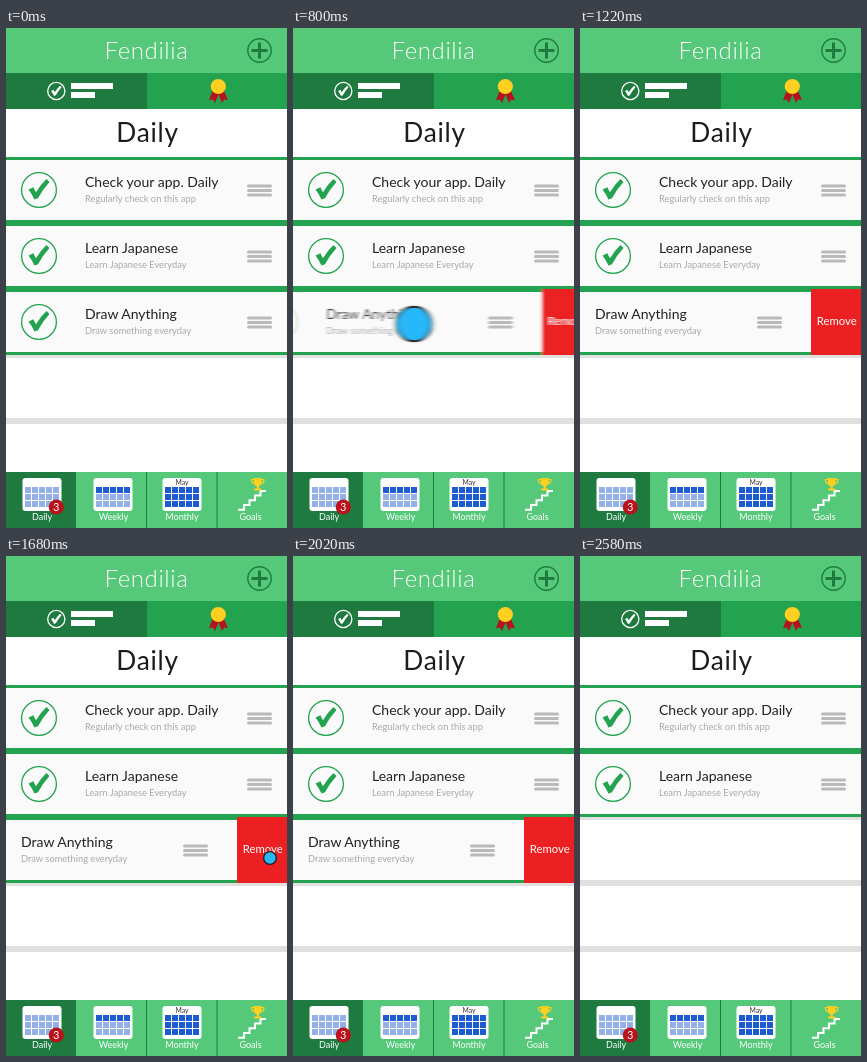
These frames come from a looping animation (281x500 px, 3.6 s). An HTML page:

```html
<!DOCTYPE html>
<html lang="en">
<head>
<meta charset="utf-8">
<title>Remove a task</title>
<style>
  html, body { margin: 0; width: 100%; height: 100%; overflow: hidden; background: #fff; }
  svg { display: block; width: 100vw; height: 100vh; }
  text { font-family: Lato, "Open Sans", sans-serif; }
  .mid { text-anchor: middle; }
  .title { font-size: 14px; fill: #222; }
  .note { font-size: 9.3px; fill: #a9a9a9; }
  .label { font-size: 9px; fill: #fff; text-anchor: middle; }
</style>
</head>
<body>
<svg viewBox="0 0 281 500">
  <defs>
    <path id="tick" d="M-10.5-.5L-5.5-2.8Q-4.500 0-3 2.200Q2-6 7.500-11L10.500-8Q4-1-1 8.200L-4.500 9.500Q-7 4-10.500-.5Z"/>
    <g id="grip" fill="#b9b9b9">
      <rect x="241" y="27.500" width="25" height="3" rx="1.500"/>
      <rect x="241" y="32" width="25" height="3" rx="1.500"/>
      <rect x="241" y="36.500" width="25" height="3" rx="1.500"/>
    </g>
    <filter id="rowBlur" filterUnits="userSpaceOnUse" x="-60" y="-10" width="460" height="90">
      <feGaussianBlur stdDeviation="0 0"/>
    </filter>
    <filter id="touchBlur" filterUnits="userSpaceOnUse" x="-40" y="-30" width="80" height="60">
      <feGaussianBlur stdDeviation="0 0"/>
    </filter>
  </defs>

  <rect width="281" height="500" fill="#fff"/>
  <g fill="#e0e0e0">
    <rect y="258" width="281" height="6"/>
    <rect y="324" width="281" height="6"/>
    <rect y="390" width="281" height="6"/>
  </g>
  <g id="rows"></g>
  <g id="touch"><circle r="17.3" fill="#27b8f8" stroke="#222" stroke-width="2"/></g>
  <circle id="tap" cx="264" cy="302" fill="#27b8f8" stroke="#222" stroke-width="1.4"/>

  <!-- header -->
  <rect width="281" height="45" fill="#55c979"/>
  <text class="mid" x="140.500" y="30.500" font-size="24" font-weight="300" letter-spacing=".6" fill="#fff">Fendilia</text>
  <g fill="none" stroke="#1f7a40">
    <circle cx="253.500" cy="22.500" r="11.700" stroke-width="1.400"/>
    <path d="M245.500 22.500h16M253.500 14.500v16" stroke-width="3"/>
  </g>
  <rect y="45" width="141" height="36" fill="#1f7a40"/>
  <rect x="141" y="45" width="140" height="36" fill="#23a24f"/>
  <circle cx="50.300" cy="63" r="8.600" fill="none" stroke="#fff" stroke-width="1.300"/>
  <use href="#tick" transform="translate(50.300 63.200) scale(.5)" fill="#fff"/>
  <path d="M65 55h42v6h-42zM65 64h24v6h-24z" fill="#fff"/>
  <path d="M207 62l-4 10 4-.5 2 3.500 4-10zM217.500 62l4.500 10-4-.5-2 3.500-4-10z" fill="#b5121b"/>
  <circle cx="212.300" cy="58.500" r="7.600" fill="#ffd01f"/>
  <text class="mid" x="141.500" y="114" font-size="26.300" letter-spacing=".7" fill="#1c1c1c">Daily</text>

  <!-- bottom bar -->
  <rect y="444" width="281" height="56" fill="#55c979"/>
  <rect y="444" width="70" height="56" fill="#1f7a40"/>
  <path d="M140.500 444v56M211 444v56" stroke="#1f7a40"/>
  <g id="calendars"></g>
  <circle cx="50.300" cy="479" r="7.600" fill="#b9121c"/>
  <text class="mid" x="50.300" y="483" font-size="11" fill="#fff">3</text>
  <path d="M232 481.700h6v-4.700h5.500v-4.700h5.500v-4.700h5.500v-4.700h5.500" fill="none" stroke="#fff" stroke-width="2"/>
  <g transform="translate(-.8 0)">
    <path d="M248.500 450h8v4q-.5 3.500-3 4.500v2h2.500v2h-7v-2h2.500v-2q-2.500-1-3-4.500z" fill="#ffd01f"/>
    <path d="M248.500 451.500h-2.300q0 4 3.300 4.500M256.500 451.500h2.300q0 4-3.300 4.500" fill="none" stroke="#ffd01f" stroke-width="1.200"/>
  </g>
  <text class="label" x="36" y="492">Daily</text>
  <text class="label" x="107.500" y="492">Weekly</text>
  <text class="label" x="176" y="492">Monthly</text>
  <text class="label" x="244.500" y="492">Goals</text>
</svg>

<script>
const LOOP = 3600;
const $ = id => document.getElementById(id);

const tasks = [
  ["Check your app. Daily", "Regularly check on this app"],
  ["Learn Japanese", "Learn Japanese Everyday"],
  ["Draw Anything", "Draw something everyday"]
];

const rowMarkup = ([title, note], i) => `
  <g id="row${i}" transform="translate(0 ${129 + 66 * i})">
    <rect x="-60" width="356" height="66" fill="#23a24f"/>
    <rect x="-60" y="3" width="356" height="60" fill="#fafafa"/>
    <g id="check${i}">
      <circle cx="33" cy="33" r="17.4" fill="none" stroke="#23a24f" stroke-width="1.3"/>
      <use href="#tick" x="33" y="33" fill="#23a24f"/>
    </g>
    <text class="title" x="79" y="30">${title}</text>
    <text class="note" x="79" y="45">${note}</text>
    <use href="#grip"/>
    <rect x="295" width="51" height="66" fill="#ec2022"/>
    <text class="mid" x="320.700" y="36" font-size="11.300" fill="#fff">Remove</text>
  </g>`;
$("rows").innerHTML = tasks.map(rowMarkup).join("");

function calendar(x, darkRows, caption = "") {
  let cells = "";
  for (let r = 0; r < 3; r++)
    for (let c = 0; c < 5; c++)
      cells += `<rect x="${x + 2 + c * 7}" y="${459 + r * 7}" width="6" height="6"
        fill="${r < darkRows ? "#1d5bd0" : "#94b0e8"}"/>`;
  return `<rect x="${x - 0.5}" y="450" width="39" height="33" rx="3" fill="#fff"/>${cells}
    <text class="mid" x="${x + 19}" y="456.500" font-size="6.800" fill="#333">${caption}</text>`;
}
$("calendars").innerHTML = calendar(17, 0) + calendar(88, 1) + calendar(157, 3, "May");

const clamp = v => Math.min(1, Math.max(0, v));
const span = (t, a, b) => clamp((t - a) / (b - a));
const ease = u => u * u * (3 - 2 * u);

// Spread of a half-open shutter for an eased move of the given distance
const spread = (u, dist, ms) => 6 * u * (1 - u) * dist / ms * 16.7 / Math.sqrt(12);

function setBlur(el, filterId, amount) {
  if (amount < 0.05) return el.removeAttribute("filter");
  $(filterId).firstElementChild.setAttribute("stdDeviation", `${amount.toFixed(2)} 0`);
  el.setAttribute("filter", `url(#${filterId})`);
}

const row = $("row2"), check = $("check2"), touch = $("touch"), tap = $("tap");

function draw(t) {
  const swipe = span(t, 620, 898), out = span(t, 2300, 2580);
  const p = ease(swipe);

  row.setAttribute("transform", `translate(${-64 * p - 290 * ease(out)} 261)`);
  row.setAttribute("visibility", out < 1 ? "visible" : "hidden");
  setBlur(row, "rowBlur", spread(swipe, 64, 278) + spread(out, 290, 280));
  check.setAttribute("opacity", 1 - p);

  touch.setAttribute("transform", `translate(${202 - 112.5 * p} 296)`);
  touch.setAttribute("opacity", span(t, 540, 640) * (1 - span(t, 1000, 1100)));
  setBlur(touch, "touchBlur", spread(swipe, 112.5, 278));

  const grow = span(t, 1580, 2020);
  tap.setAttribute("r", 27.8 * grow);
  tap.setAttribute("opacity", grow > 0 ? 1 - span(grow, 0.4, 1) : 0);
}

const start = performance.now();
function tick() {
  draw((performance.now() - start) % LOOP);
  requestAnimationFrame(tick);
}
tick();
</script>
</body>
</html>
```
